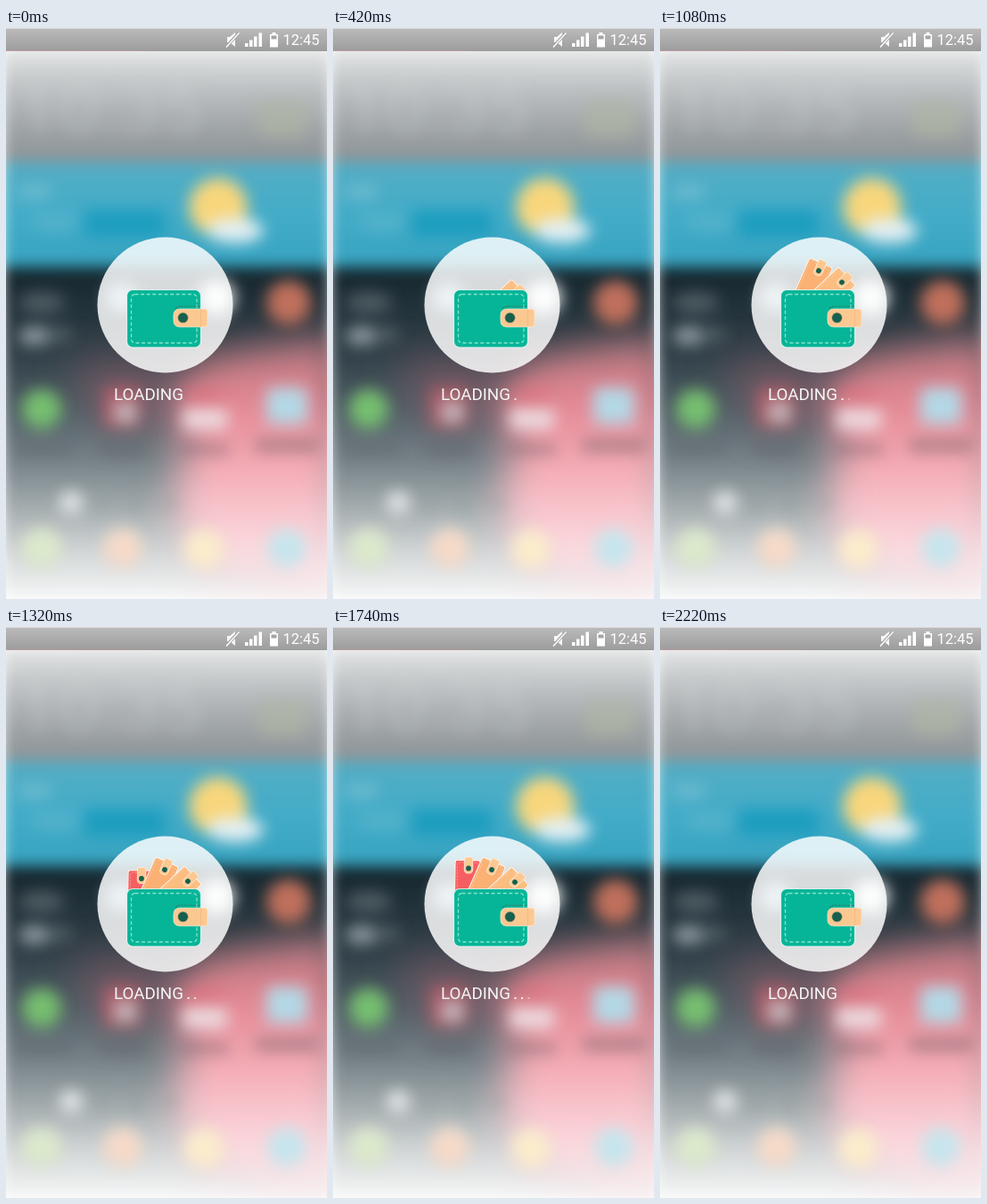
Animation, 360 px wide and 640 px high, one loop 2280 ms. Source, as an HTML page:

```html
<!DOCTYPE html>
<html lang="en">
<head>
<meta charset="utf-8">
<title>Wallet loading screen</title>
<style>
  html, body { margin: 0; width: 100%; height: 100%; overflow: hidden; background: #fff; }
  svg { position: absolute; left: 0; top: 0; width: 360px; height: 640px; }
  text { font-family: Roboto, Arial, sans-serif; }
  .base { filter: blur(8px); }
  .glow { filter: blur(22px); }
  .items { filter: blur(8.5px); }
</style>
</head>
<body>
<svg viewBox="0 0 360 640" aria-hidden="true">
  <defs>
    <linearGradient id="sky" x2="0" y2="1">
      <stop offset="0" stop-color="#e6e8e8"/><stop offset=".35" stop-color="#bdc1c3"/>
      <stop offset=".7" stop-color="#9fa4a7"/><stop offset="1" stop-color="#8b9194"/>
    </linearGradient>
    <linearGradient id="sea" x2="0" y2="1">
      <stop offset="0" stop-color="#55adc4"/><stop offset=".5" stop-color="#43acc8"/><stop offset="1" stop-color="#36a3c0"/>
    </linearGradient>
    <linearGradient id="night" x2="0" y2="1">
      <stop offset="0" stop-color="#15252d"/><stop offset=".28" stop-color="#34434b"/>
      <stop offset=".45" stop-color="#56646b"/><stop offset=".62" stop-color="#818c91"/>
      <stop offset=".74" stop-color="#a9b1b3"/><stop offset=".86" stop-color="#d3d7d8"/>
      <stop offset="1" stop-color="#f6f7f7"/>
    </linearGradient>
    <linearGradient id="rose" x2="0" y2="1">
      <stop offset="0" stop-color="#b87a80"/><stop offset=".22" stop-color="#e08490"/>
      <stop offset=".5" stop-color="#f5abb5"/><stop offset=".75" stop-color="#fad3d9"/>
      <stop offset="1" stop-color="#fdf1f3"/>
    </linearGradient>
  </defs>
  <g class="base">
    <rect x="-4" y="22" width="368" height="130" fill="url(#sky)"/>
    <rect x="-4" y="150" width="368" height="119" fill="url(#sea)"/>
    <rect x="-4" y="268" width="368" height="372" fill="url(#night)"/>
  </g>
  <g class="glow">
    <path d="M375 345 L285 358 L215 372 L188 410 L200 480 L185 540 L220 610 L375 640Z" fill="url(#rose)"/>
    <path d="M70 375 L170 365 L195 440 L110 450Z" fill="#8a5e6c" opacity=".6"/>
  </g>
  <g class="items">
    <text x="12" y="118" font-size="82" font-weight="500" fill="#d5d9da" opacity=".3">10:35</text>
    <rect x="282" y="82" width="56" height="40" rx="12" fill="#b1b8a2" opacity=".6"/>
    <ellipse cx="32" cy="184" rx="20" ry="8" fill="#8fcbdc" opacity=".5"/>
    <ellipse cx="55" cy="218" rx="28" ry="8" fill="#7cc2d5" opacity=".4"/>
    <rect x="88" y="204" width="90" height="30" fill="#1199bd" opacity=".75"/>
    <circle cx="238" cy="201" r="33" fill="#f8d67c"/>
    <ellipse cx="257" cy="227" rx="32" ry="14" fill="#e4eff2"/>
    <ellipse cx="40" cy="308" rx="26" ry="12" fill="#7b868c" opacity=".5"/>
    <ellipse cx="32" cy="345" rx="18" ry="10" fill="#b8c0c4" opacity=".75"/>
    <ellipse cx="62" cy="343" rx="12" ry="9" fill="#78848a" opacity=".5"/>
    <ellipse cx="236" cy="302" rx="20" ry="20" fill="#f3f6f7"/>
    <ellipse cx="130" cy="302" rx="18" ry="16" fill="#9ec0d0"/>
    <circle cx="317" cy="308" r="25" fill="#c0705c"/>
    <circle cx="40" cy="427" r="22" fill="#76bf70"/>
    <rect x="109" y="402" width="42" height="46" rx="6" fill="#b8606b" opacity=".85"/>
    <rect x="122" y="420" width="24" height="22" fill="#c4bcc0"/>
    <rect x="200" y="402" width="44" height="24" rx="6" fill="#dc7481" opacity=".7"/>
    <rect x="198" y="426" width="50" height="24" rx="6" fill="#ecdade"/>
    <rect x="292" y="403" width="46" height="41" rx="6" fill="#b3d8e6"/>
    <g fill="#59565e" opacity=".5">
      <rect x="12" y="468" width="60" height="9"/><rect x="105" y="468" width="50" height="9"/>
      <rect x="196" y="468" width="54" height="9"/><rect x="280" y="462" width="70" height="12"/>
    </g>
    <circle cx="73" cy="532" r="13" fill="#e9eced" opacity=".9"/>
    <g fill="#8f989c" opacity=".4">
      <circle cx="108" cy="533" r="9"/><circle cx="146" cy="533" r="9"/><circle cx="184" cy="533" r="9"/>
    </g>
    <circle cx="40" cy="583" r="22" fill="#dbe9cb"/>
    <circle cx="131" cy="583" r="22" fill="#f6dac8"/>
    <circle cx="222" cy="584" r="22" fill="#fbeccb"/>
    <circle cx="315" cy="583" r="22" fill="#c6e5ed"/>
  </g>
</svg>

<svg viewBox="0 0 360 640">
  <defs>
    <linearGradient id="bar" x2="0" y2="1">
      <stop offset="0" stop-color="#bcbbbb"/><stop offset="1" stop-color="#9c9c9c"/>
    </linearGradient>
    <linearGradient id="hair">
      <stop offset="0" stop-color="#d99ba2"/><stop offset=".7" stop-color="#cf9a9f"/><stop offset="1" stop-color="#a5a0a0" stop-opacity="0"/>
    </linearGradient>
    <clipPath id="mouth"><rect x="100" y="230" width="160" height="65"/></clipPath>
  </defs>
  <rect width="360" height="26" fill="url(#bar)"/>
  <rect width="360" height="1" fill="#dcdada"/>
  <rect y="25" width="190" height="1" fill="url(#hair)" opacity=".6"/>
  <g fill="#fff">
    <path d="M248 10h3l6-5v16l-6-5h-3z" opacity=".9"/>
    <path d="M261 6L247 21" stroke="#a5a5a5" stroke-width="3.4"/>
    <path d="M261.500 5.500L247 21.500" stroke="#fff" stroke-width="1.400"/>
    <rect x="268" y="17" width="3.500" height="4"/>
    <rect x="273" y="13.500" width="3.500" height="7.500"/>
    <rect x="278" y="9.500" width="3.500" height="11.500"/>
    <rect x="283.500" y="5.500" width="3.500" height="15.500"/>
    <path d="M298.500 5h4v2h2.500v14.500h-9v-14.500h2.500z"/>
    <rect x="297.500" y="8.500" width="6" height="4" fill="#a5a5a5"/>
    <text x="310.500" y="19" font-size="16.500">12:45</text>
  </g>

  <circle cx="178.500" cy="310.500" r="76" fill="#fff" opacity=".83"/>
  <g id="cards" clip-path="url(#mouth)"></g>

  <rect x="135.500" y="293.500" width="83" height="64.500" rx="6.500" fill="#06b597" stroke="#f2fbf9" stroke-width="1.200" stroke-opacity=".8"/>
  <rect x="140.500" y="298.500" width="73.500" height="54.500" rx="4" fill="none" stroke="#84e2cd" stroke-width="1.300" stroke-dasharray="4 2.600"/>
  <path d="M190 314.500q2-2.500 5-2.500h23" fill="none" stroke="#2c7f6d" stroke-width="1.200" stroke-dasharray="2.500 1"/>
  <path d="M195 315h28q3 0 3 3v14q0 3-3 3h-28q-7 0-7-7v-6q0-7 7-7z" fill="#fcc892" stroke="#ffe6cb" stroke-width=".8"/>
  <path d="M218.500 315v20" stroke="#f2b67c" stroke-width=".8"/>
  <circle cx="198.500" cy="324.800" r="5.800" fill="#17604f" stroke="#d8a878" stroke-width=".6"/>

  <text x="120.900" y="417" font-size="18.800" fill="#f5f5f5">LOADING</text>
  <g id="dots" fill="#f5f5f5"></g>
</svg>

<script>
  const NS = 'http://www.w3.org/2000/svg';
  const LOOP = 2280, STEP = 60, RISE = 400;

  const add = (parent, tag, attrs) => {
    const el = document.createElementNS(NS, tag);
    for (const key in attrs) el.setAttribute(key, attrs[key]);
    return parent.appendChild(el);
  };

  // Resting place of the button, tilt, colour, travel, start of rise and fall.
  const cards = [
    { x: 152, y: 270.5, tilt: 1, fill: '#f65f62', travel: 38, up: 1140, down: 1860 },
    { x: 178, y: 272, tilt: 24, fill: '#fab173', travel: 38, up: 700, down: 1860 },
    { x: 204, y: 285, tilt: 47, fill: '#fbbd80', travel: 28, up: 300, down: 1680 }
  ];
  const dots = [
    { x: 204.5, start: 60 }, { x: 212, start: 960 }, { x: 219.5, start: 1560 }
  ];

  for (const c of cards) {
    c.el = add(document.getElementById('cards'), 'g', {});
    add(c.el, 'rect', { x: -15, y: -9, width: 28, height: 52, rx: 2.5, fill: c.fill, stroke: '#fff3e8', 'stroke-width': 1 });
    add(c.el, 'rect', { x: -12.5, y: -6.5, width: 23, height: 47, rx: 1.5, fill: 'none', stroke: '#ffe3cd', 'stroke-width': .6, 'stroke-dasharray': '2 1.5', opacity: .7 });
    add(c.el, 'path', { d: 'M-4.700 -11q0-1.500 1.500-1.500h6.400q1.500 0 1.500 1.500v12.500q0 4-4 4h-1.400q-4 0-4-4z', fill: '#fcc892', stroke: '#fff0df', 'stroke-width': .8 });
    add(c.el, 'circle', { r: 2.9, fill: '#17604f' });
  }
  for (const d of dots) {
    d.el = add(document.getElementById('dots'), 'rect', { x: d.x - 1, y: 415, width: 2, height: 2 });
  }

  const clamp = v => Math.min(1, Math.max(0, v));

  function draw(t) {
    for (const c of cards) {
      const left = 1 - clamp((t - c.up) / RISE);
      const fall = Math.max(0, (t - c.down) / 300);
      const drop = c.travel * left * left + 24 * fall * fall;
      const shown = t > c.up && t < 2220;
      c.el.setAttribute('visibility', shown ? 'visible' : 'hidden');
      c.el.setAttribute('transform', `translate(${c.x} ${c.y + drop}) rotate(${c.tilt})`);
    }
    for (const d of dots) {
      d.el.setAttribute('opacity', t < 2160 ? clamp((t - d.start) / 420) : 0);
    }
  }

  const begin = performance.now();
  function tick() {
    const t = (performance.now() - begin) % LOOP;
    draw(Math.floor(t / STEP) * STEP);
    requestAnimationFrame(tick);
  }
  tick();
</script>
</body>
</html>
```
